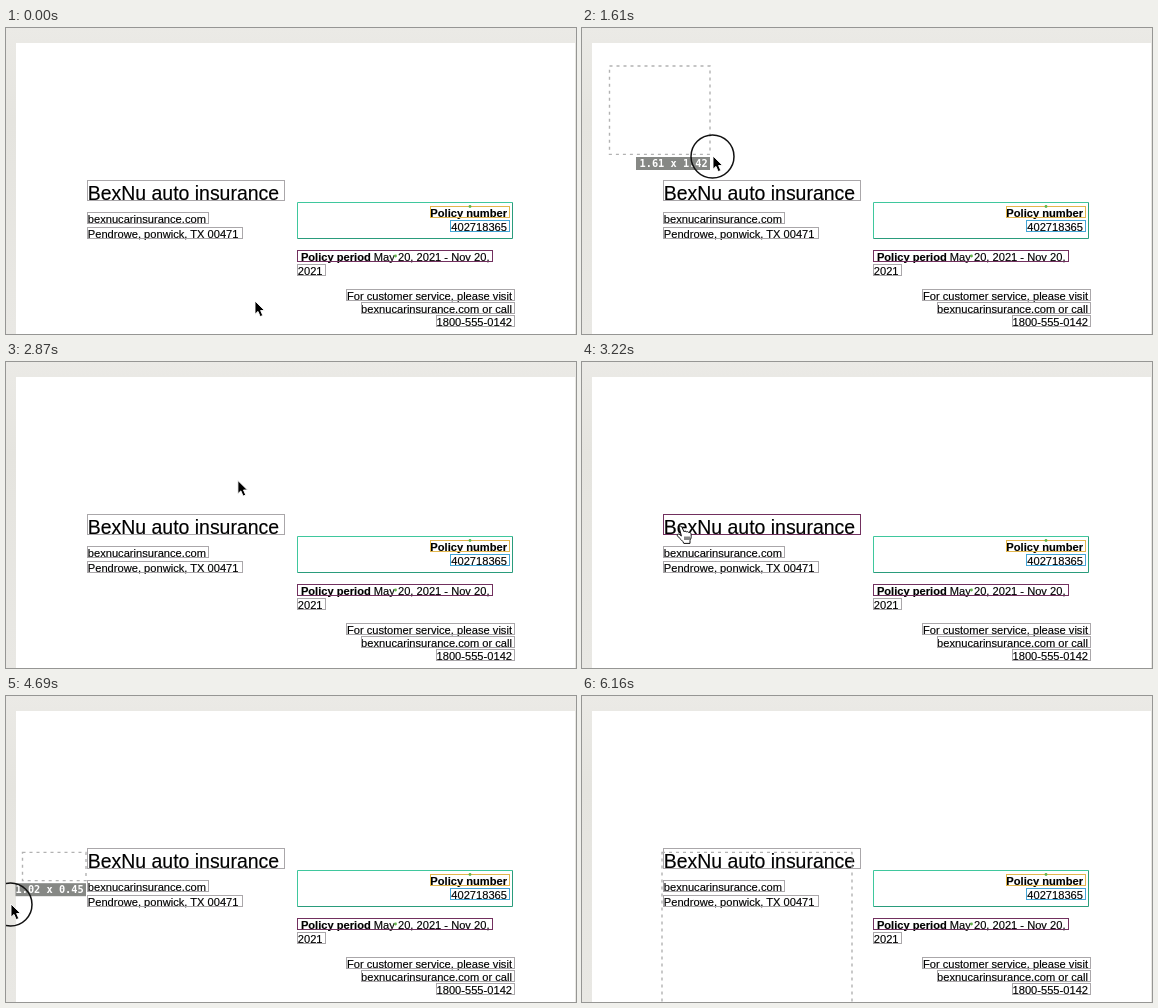
Animation, 570 px wide and 306 px high, one loop 6440 ms. Source, as an HTML page:

```html
<!DOCTYPE html>
<html lang="en">
<head>
<meta charset="utf-8">
<title>Drawing field boxes</title>
<style>
html, body { margin: 0; width: 100%; height: 100%; overflow: hidden; background: #e9e8e4; }
svg { display: block; }
text { font: 11.13px "Liberation Sans", Arial, sans-serif; fill: #000; stroke: #000; stroke-width: .15px; white-space: pre; }
.b { font-weight: 700; }
.title { font-size: 19.45px; }
#size { font: 700 10.3px "DejaVu Sans Mono", monospace; fill: #fff; stroke: none; }
</style>
</head>
<body>
<svg id="stage" width="570" height="306" viewBox="0 0 570 306">
  <defs>
    <linearGradient id="edge" x2="0" y2="1">
      <stop offset="0" stop-color="#ebeae6"/>
      <stop offset=".3" stop-color="#e5e4df"/>
      <stop offset="1" stop-color="#e9e8e4"/>
    </linearGradient>
    <clipPath id="canvas"><path d="M9.5 14H569V306H9.5Z"/></clipPath>
  </defs>
  <rect width="570" height="306" fill="url(#edge)"/>
  <rect x="10" y="15" width="559" height="291" fill="#fff"/>
  <g id="fields" fill="none">
    <path d="M291.5 210.5V174.5H506.5" stroke="#3fc79d"/>
    <path d="M291.5 210.5H506.5V174.5" stroke="#2a9c7c"/>
  </g>
  <g fill="#62b34a">
    <circle cx="464" cy="178.5" r="1.4"/>
    <circle cx="389.5" cy="228" r="1.4"/>
  </g>
  <g clip-path="url(#canvas)">
    <g id="drag">
      <rect id="area" fill="none" stroke="#b2b2b2" stroke-width="1.4" stroke-dasharray="3 4"/>
      <g id="tag">
        <rect width="74" height="13" fill="#868885"/>
        <text id="size" x="3.5" y="10.2"></text>
      </g>
    </g>
  </g>
  <g id="pointer">
    <circle id="ring" cx="-.5" cy=".5" r="21.5" fill="none" stroke="#111" stroke-width="1.5"/>
    <path id="arrow" d="M0 0V13.2L3 10.4L5.2 15.6L7.8 14.5L5.6 9.5H9.6Z" stroke="#fff" stroke-width=".9"/>
    <path id="hand" d="M-.6 1.2C-1.4-.8.9-1.8 1.9.2L4 4.8C4.8 3.9 6 4.2 6.4 5C7.2 4.3 8.5 4.7 8.8 5.6C9.9 5.2 11 6 11.1 7.2C11.5 10.3 10.8 12 10 13.6V16.4H3.8C3.3 13.9-.4 11.8-2.6 8.8C-3.4 7.2-1.6 6.4-.3 7.6L1.4 9ZM5 9.5V13M7 9.5V13M9 9.5V13"
      fill="#fff" stroke="#111"/>
  </g>
</svg>
<script>
const LOOP = 6440, STEP = 70, PX_PER_INCH = 62.3;
const GREY = '#aaa7aa', PURPLE = '#72305f';
const SITE = 'bexnucarinsurance.com';
const $ = id => document.getElementById(id);

function add(parent, tag, attrs, text = '') {
  const el = document.createElementNS('http://www.w3.org/2000/svg', tag);
  for (const k in attrs) el.setAttribute(k, attrs[k]);
  el.textContent = text;
  return parent.appendChild(el);
}

// An outlined line of text, cut off just below the box.
function field(x, y, width, text, { height = 12, color = GREY, css = '', right = false, plain = '' } = {}) {
  const view = add($('fields'), 'svg', { width: 570, height: y + height + 1 });
  const label = add(view, 'text', {
    x: right ? x + width - 3 : x + .8, y: y + height - 1, 'text-anchor': right ? 'end' : 'start'
  });
  add(label, 'tspan', { class: css }, text);
  if (plain) add(label, 'tspan', {}, plain);
  return add(view, 'rect', { x: x + .5, y: y + .5, width: width - 1, height: height - 1, stroke: color });
}

const title = field(81, 152, 198, 'BexNu auto insurance', { height: 21, css: 'title' });
field(81, 184, 122, SITE);
field(81, 199, 156, 'Pendrowe, ponwick, TX 00471');
field(424, 178, 80, 'Policy number', { color: '#e3b64c', css: 'b', right: true });
field(444, 192, 60, '402718365', { color: '#43a5d6', right: true });
field(291, 222, 196, ' Policy period', { color: PURPLE, css: 'b', plain: ' May 20, 2021 - Nov 20,' });
field(291, 236, 29, '2021');
field(340, 261, 169, 'For customer service, please visit', { right: true });
field(355, 274, 154, SITE + ' or call', { right: true });
field(430, 287, 79, '1800-555-0142', { right: true });

// Each move: start time, end time, then where it ends; it rests in between.
const pointer = { x: 249, y: 273, moves: [
  [0, 280, 53, 48], [350, 560, 53, 44], [770, 910, 27, 37], [910, 1610, 131, 128],
  [1750, 1960, 146, 125], [1960, 2280, 265, 107], [2730, 3220, 98, 165], [3430, 3850, 80, 155],
  [4060, 4130, 75, 162], [4130, 4340, 10, 186], [4410, 4690, 5, 208], [4760, 5250, 5, 186],
  [5460, 5530, 5, 197], [5530, 6160, 280, 345]
] };
const drags = [
  { press: 700, from: 910, to: 2800, x: 27.5, y: 38,
    moves: [[910, 1610, 128, 126.4], [2030, 2280, 258, 110.2]] },
  { press: 3920, from: 3920, to: LOOP, x: 80, y: 156.4,
    moves: [[4130, 4340, 16.5, 184.6], [5530, 6160, 270, 335]] }
];

function at({ x, y, moves }, t) {
  for (const [start, end, toX, toY] of moves) {
    if (t <= start) break;
    const u = Math.min(1, (t - start) / (end - start));
    const k = u * u * (3 - 2 * u);
    x += (toX - x) * k;
    y += (toY - y) * k;
  }
  return [x, y];
}

const show = (id, on) => $(id).setAttribute('display', on ? 'inline' : 'none');

function drawDrag(drag, t) {
  const [endX, endY] = at(drag, t);
  const x = Math.min(endX, drag.x), y = Math.min(endY, drag.y);
  const width = Math.abs(endX - drag.x), height = Math.abs(endY - drag.y);
  const box = { x, y, width, height };
  for (const k in box) $('area').setAttribute(k, box[k]);
  $('tag').setAttribute('transform', `translate(${x + width - 74} ${y + height + 2.6})`);
  $('size').textContent = [width, height].map(v => (v / PX_PER_INCH).toFixed(2)).join(' x ');
}

function draw(t) {
  const [x, y] = at(pointer, t);
  const drag = drags.find(d => t >= d.press && t < d.to);
  const hover = !drag && x > 81 && x < 279 && y > 153 && y < 173;
  title.setAttribute('stroke', hover ? PURPLE : GREY);
  $('pointer').setAttribute('transform', `translate(${x} ${y})`);
  show('ring', drag);
  show('arrow', !hover);
  show('hand', hover);
  show('drag', drag && t >= drag.from);
  if (drag) drawDrag(drag, t);
}

const start = performance.now();
function tick(now) {
  const t = Math.max(0, now - start) % LOOP;
  draw(Math.floor(t / STEP) * STEP);
  requestAnimationFrame(tick);
}
draw(0);
requestAnimationFrame(tick);
</script>
</body>
</html>
```
